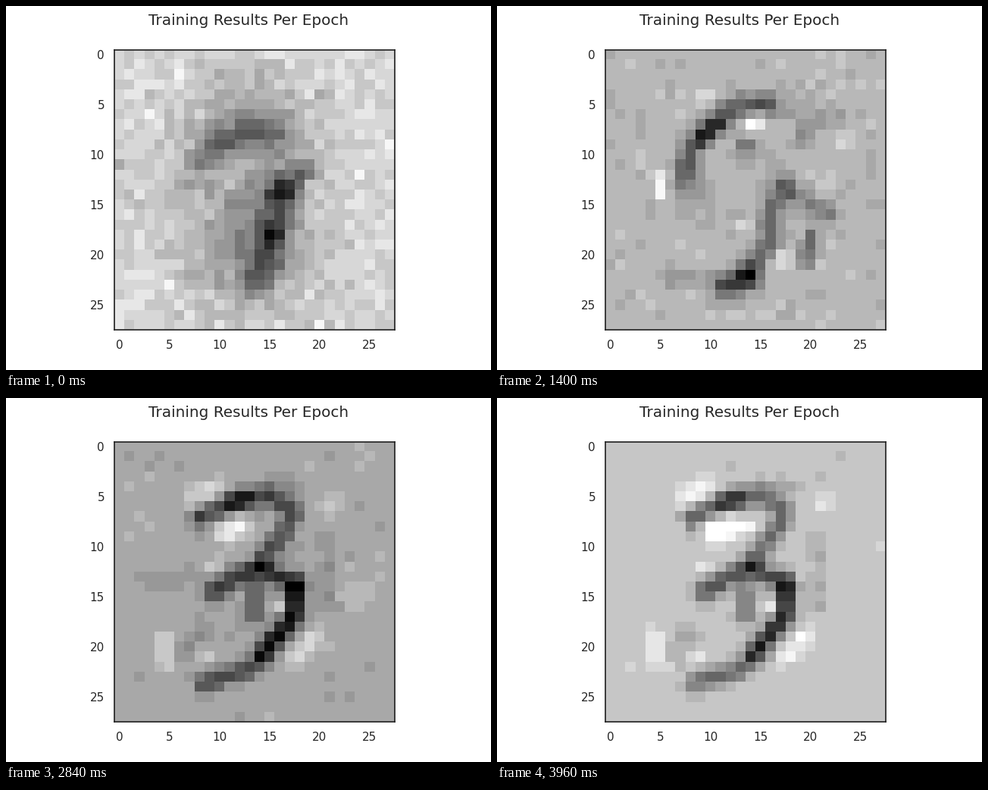
Animation, 640 px wide and 480 px high, one loop 4000 ms. Source, as a matplotlib script:

```python
import numpy as np
import matplotlib.pyplot as plt
from matplotlib.animation import FuncAnimation

N = 28          # cells per side
STEP = 16       # grey step between tones
FRAMES = 100
INK = "0.15"

yy, xx = np.mgrid[0:N, 0:N].astype(float)


def stroke(width, amp, *xy):
    """Soft line through x, y pairs; a positive amp is darker."""
    pts = list(zip(xy[::2], xy[1::2]))
    if len(pts) == 1:
        pts *= 2
    best = np.full((N, N), np.inf)
    for (x0, y0), (x1, y1) in zip(pts, pts[1:]):
        dx, dy = x1 - x0, y1 - y0
        t = np.clip(((xx - x0) * dx + (yy - y0) * dy) / (dx * dx + dy * dy or 1), 0, 1)
        best = np.minimum(best, (xx - x0 - t * dx) ** 2 + (yy - y0 - t * dy) ** 2)
    return amp * np.exp(-best / width ** 2)


def draw(strokes):
    return sum(stroke(*s) for s in strokes)


blob = draw([
    (6.5, 4.3, 13, 9, 13, 19),
    (1.3, 4, 8, 10.5, 12, 7.5, 16, 7.5),
    (1.2, 4.5, 18.5, 11.5, 16.5, 13.5),
    (1.6, 5.5, 16, 14, 15.3, 18, 13.8, 22.5),
    (0.8, 4, 15.3, 18),
    (1.5, -2.5, 11.2, 12),
    (0.8, 2.7, 6.5, 13),
])

knot = draw([
    (1.4, 4.5, 10, 5.5, 17, 5.3),
    (1.6, 6, 13.8, 7, 13.5, 9, 12, 12),
    (1.2, 2.7, 20, 5, 23, 5),
    (1.2, 5, 8, 13.6, 13, 12.8),
    (1.2, 12, 15, 12.7, 17.1, 15, 17, 18, 13.2, 21.6),
    (1.3, 6.5, 12, 22.5, 8.5, 22.5, 6, 19.5),
    (2, 3.5, 14, 18.5),
    (1.1, 2.5, 20, 18, 22, 17.5),
    (0.7, -2.6, 13, 3, 16, 3),
    (0.7, -2, 20.5, 14, 20.5, 16),
    (0.8, -2.4, 15.5, 24.5),
    (0.6, -2.4, 4, 23, 7, 23.5),
    (0.9, -3.5, 10, 15.2, 12, 15.2),
])

hooks = draw([
    (1.1, 6, 7.5, 12, 8, 9.5, 11, 6.3, 13, 5, 16, 5),
    (0.9, 4.5, 9, 8.3, 10.5, 7.2),
    (1.1, 4.5, 13.5, 9.3),
    (1.9, 2.3, 8, 14),
    (1.1, 5, 17.2, 13, 16, 16, 16, 18.5, 13.8, 22),
    (1.2, 8, 13.6, 22.2, 11.5, 23.2),
    (0.9, 4, 18, 13.8, 22, 16),
    (0.9, 5, 20, 18, 19.5, 20.5),
    (0.8, 4.5, 19.3, 8.3),
    (1.2, 1.9, 18.5, 6.3, 22.5, 6.3),
    (0.9, 1.8, 6, 22.3, 9.5, 22.3),
    (0.7, -4, 5, 12, 5, 14),
    (0.9, -3, 9.5, 4.2),
    (0.8, -6.5, 14.2, 7),
    (0.8, -3.2, 17.3, 20.5),
    (0.9, -1.8, 23.5, 8.5),
    (0.7, -3, 13.3, 17),
])

three = draw([
    (1, 6, 8.2, 7, 11, 5.8, 15, 5, 17.4, 6.5, 16.4, 8.5, 14.2, 11.5),
    (0.9, 5, 11.3, 5.6, 12.5, 5),
    (1, 7.5, 9.5, 14.5, 12, 12.8, 14, 12.3, 17.5, 13.5),
    (1, 10.5, 17.5, 14.5, 17.4, 17, 14.2, 21),
    (1, 6, 12.7, 22.4, 8.5, 23.6),
    (1, 5, 13.5, 14.6, 13.5, 17),
    (1.2, 1.8, 8, 18.8, 6.3, 20.5),
    (0.8, 1.7, 20.6, 9, 20.8, 16),
    (0.9, 1.7, 14, 4, 18, 4),
    (0.9, 1.7, 8, 8),
])

glow = draw([
    (1, -3, 7.5, 5, 9.5, 4.2),
    (1, -5, 10.6, 8.6, 12, 8),
    (1, -2, 21.3, 5.7),
    (1.1, -2.9, 4.5, 19.5, 4.7, 21),
    (1, -3, 17.6, 20.9, 19.5, 19.2),
    (0.8, -2.5, 8.6, 20.8),
    (0.7, -3.5, 16, 16),
    (0.9, -1.8, 9.3, 11.8),
])

digit = three + glow
band = stroke(0.9, 1, 3, 13.4, 7, 13.4) + stroke(1.8, -0.9, 24, 14)
pale = stroke(0.7, -3, 10, 8, 14, 8) + stroke(0.6, -2, 19, 19)

# frame number, background grey, noise, field
STAGES = [
    (0, 215, 0.75, blob),
    (14, 228, 0.27, knot),
    (35, 184, 0.36, hooks),
    (52, 184, 0.15, digit),
    (71, 168, 0.27, digit + band),
    (83, 178, 0.38, digit),
    (99, 198, 0.2, digit + pale),
]


def picture(i):
    k = max(j for j, s in enumerate(STAGES[:-1]) if s[0] <= i)
    (i0, bg0, n0, f0), (i1, bg1, n1, f1) = STAGES[k], STAGES[k + 1]
    t = (i - i0) / (i1 - i0)
    between = 4 * t * (1 - t)
    rng = np.random.default_rng(700 + i)
    # every epoch wavers a little in tone and contrast
    bg = bg0 + t * (bg1 - bg0) + 5 * between * rng.normal()
    field = (f0 + t * (f1 - f0)) * (1 + 0.05 * between * rng.normal())
    field += (n0 + t * (n1 - n0)) * rng.normal(size=(N, N))
    return np.clip(bg - STEP * np.round(field), 0, 255)


plt.rcParams.update({
    "font.family": "DejaVu Sans", "font.size": 12, "text.color": INK,
    "axes.edgecolor": INK, "axes.linewidth": 1.25,
})
fig, ax = plt.subplots(figsize=(6.4, 4.8), dpi=100)
fig.suptitle("Training Results Per Epoch", fontsize=14.4)
img = ax.imshow(picture(0), cmap="gray", vmin=0, vmax=255, interpolation="nearest")
ax.set_xticks(range(0, N, 5))
ax.set_yticks(range(0, N, 5))
ax.tick_params(length=0, pad=9.5, labelsize=11, labelcolor=INK)


def update(i):
    img.set_data(picture(i))
    return [img]


anim = FuncAnimation(fig, update, frames=FRAMES, interval=40, repeat=True)
plt.show()
```
